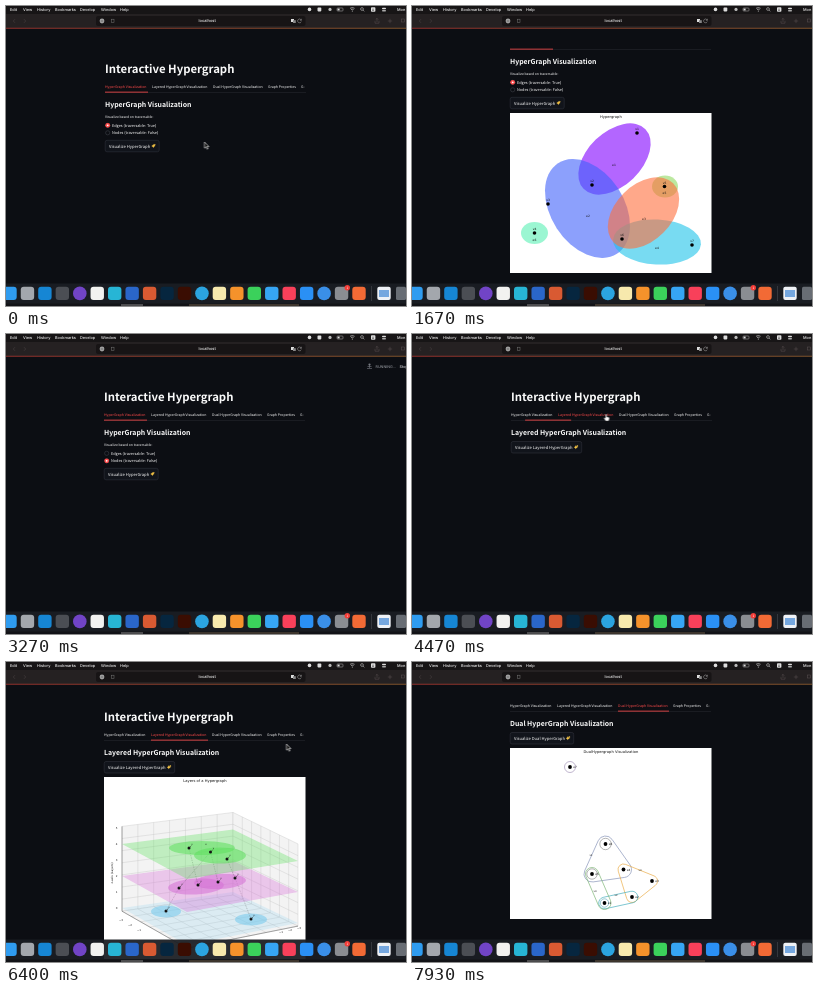
These frames come from a looping animation (400 by 300 pixels, 8 s). An HTML page:

```html
<!DOCTYPE html>
<html lang="en">
<head>
<meta charset="utf-8">
<title>Interactive Hypergraph</title>
<style>
html, body { margin: 0; width: 100%; height: 100%; overflow: hidden; background: #0c0e13; }
svg { display: block; width: 100vw; height: 100vh; }
text { font-family: "Noto Sans CJK SC", "Noto Sans CJK JP", "Open Sans", sans-serif; font-weight: 500; fill: #fafafa; text-rendering: geometricPrecision; white-space: pre; }
.title { font-weight: 700; }
.ui { font-family: Inter, sans-serif; }
.plot text { font-family: "DejaVu Sans", sans-serif; font-weight: 400; fill: #111; text-anchor: middle; }
#page, #cursor, #bar, .cut { animation: 8s linear infinite; }
.cut { animation-timing-function: step-end; }
#page { animation-name: scroll; }
#bar { animation-name: bar; }
#cursor { animation-name: move; }
#arrow { animation-name: arrow; }
#hand { animation-name: hand; }
#home { animation-name: home; }
#layered { animation-name: layered; }
#dual { animation-name: dual; }
#homePlot { animation-name: homePlot; }
#layeredPlot { animation-name: layeredPlot; }
#dualPlot { animation-name: dualPlot; }
#edgesOn { animation-name: edgesOn; }
#nodesOn { animation-name: nodesOn; }
#running { animation-name: running; }
#tab0 { animation-name: tab0; }
#tab1 { animation-name: tab1; }
#tab2 { animation-name: tab2; }

@keyframes scroll {
  0%, 11.2% { transform: translate(0, 0); }
  11.25%, 14.4% { transform: translate(-1px, 0); animation-timing-function: ease-in-out; }
  20%, 27% { transform: translate(-1px, -43px); animation-timing-function: ease-in-out; }
  32.5%, 43.75% { transform: translate(-1px, 0); animation-timing-function: ease-in-out; }
  47%, 49.4% { transform: translate(-1px, -30px); animation-timing-function: ease-in-out; }
  52.5%, 54.99% { transform: translate(-1px, 0); }
  55%, 64.99% { transform: translate(0, 0); }
  65%, 73.75% { transform: translate(-1px, 0); animation-timing-function: ease-in-out; }
  78.75%, 83.74% { transform: translate(-1px, -8px); }
  83.75%, 91.8% { transform: translate(0, 0); }
  91.85%, 93.5% { transform: translate(-1px, 0); animation-timing-function: ease-in-out; }
  97.5%, 100% { transform: translate(-1px, -37px); }
}
@keyframes bar {
  0%, 55% { transform: translate(99px, 0) scaleX(43); }
  55.88% { transform: translate(113px, 0) scaleX(46); }
  58%, 83.75% { transform: translate(146px, 0) scaleX(57); }
  86.5%, 100% { transform: translate(207px, 0) scaleX(51); }
}
@keyframes move {
  0%, 1.5% { transform: translate(198.5px, 136px); animation-timing-function: ease-in-out; }
  6%, 31% { transform: translate(140px, 140px); animation-timing-function: ease-in-out; }
  35.5%, 37% { transform: translate(122px, 126px); animation-timing-function: ease-in-out; }
  39.5%, 52% { transform: translate(136px, 140px); animation-timing-function: ease-in-out; }
  54.8%, 57% { transform: translate(193.5px, 80px); animation-timing-function: ease-in-out; }
  61%, 73% { transform: translate(145px, 113px); animation-timing-function: ease-in-out; }
  79%, 80.3% { transform: translate(280.5px, 82px); animation-timing-function: ease-in-out; }
  83.4%, 84.5% { transform: translate(236px, 72px); animation-timing-function: ease-in-out; }
  88%, 100% { transform: translate(142px, 113px); }
}
@keyframes arrow { 0% { opacity: 1 } 14.4% { opacity: 0 } 31% { opacity: 1 } 40% { opacity: 0 } 51.5% { opacity: 1 } 54.5% { opacity: 0 } 57.5% { opacity: 1 } 65% { opacity: 0 } 74% { opacity: 1 } 83% { opacity: 0 } 85% { opacity: 1 } 92%, 100% { opacity: 0 } }
@keyframes hand { 0% { opacity: 0 } 54.5% { opacity: 1 } 57.5% { opacity: 0 } 83% { opacity: 1 } 85%, 100% { opacity: 0 } }
@keyframes home { 0% { opacity: 1 } 55%, 100% { opacity: 0 } }
@keyframes layered { 0% { opacity: 0 } 55% { opacity: 1 } 83.75%, 100% { opacity: 0 } }
@keyframes dual { 0% { opacity: 0 } 83.75%, 100% { opacity: 1 } }
@keyframes homePlot { 0% { opacity: 0 } 11.25% { opacity: 1 } 36.9% { opacity: 0 } 41.9% { opacity: 1 } 55%, 100% { opacity: 0 } }
@keyframes layeredPlot { 0% { opacity: 0 } 65%, 100% { opacity: 1 } }
@keyframes dualPlot { 0% { opacity: 0 } 91.85%, 100% { opacity: 1 } }
@keyframes edgesOn { 0% { opacity: 1 } 36.5%, 100% { opacity: 0 } }
@keyframes nodesOn { 0% { opacity: 0 } 36.5%, 100% { opacity: 1 } }
@keyframes running { 0% { opacity: 0 } 7.5% { opacity: 1 } 11.25% { opacity: 0 } 36.5% { opacity: 1 } 42% { opacity: 0 } 62% { opacity: 1 } 65% { opacity: 0 } 89% { opacity: 1 } 92%, 100% { opacity: 0 } }
@keyframes tab0 { 0% { fill: #ff4b4b } 55%, 100% { fill: #fafafa } }
@keyframes tab1 { 0% { fill: #fafafa } 55% { fill: #ff4b4b } 83.75%, 100% { fill: #fafafa } }
@keyframes tab2 { 0% { fill: #fafafa } 83.75%, 100% { fill: #ff4b4b } }
</style>
</head>
<body>
<svg id="stage" viewBox="0 0 400 300" preserveAspectRatio="none"></svg>
<script>
const background = '#0c0e13';
const text = (x, y, size, words, extra = '') =>
  `<text x="${x}" y="${y}" font-size="${size}" ${extra}>${words}</text>`;
const rect = (x, y, w, h, fill, extra = '') =>
  `<rect x="${x}" y="${y}" width="${w}" height="${h}" fill="${fill}" ${extra}/>`;
const circle = (x, y, r, fill, extra = '') =>
  `<circle cx="${x}" cy="${y}" r="${r}" fill="${fill}" ${extra}/>`;
const path = (d, stroke, width, extra = '') =>
  `<path d="${d}" fill="none" stroke="${stroke}" stroke-width="${width}" ${extra}/>`;
const oval = (x, y, rx, ry, turn, fill, alpha = .6) =>
  `<ellipse rx="${rx}" ry="${ry}" transform="translate(${x} ${y}) rotate(${turn})" fill="${fill}" opacity="${alpha}"/>`;
const group = (id, body, cls = 'cut') => `<g id="${id}" class="${cls}">${body}</g>`;
const polygon = (points, fill, alpha) =>
  `<polygon points="${points.join(' ')}" fill="${fill}" fill-opacity="${alpha}"/>`;

const heading = words => text(99, 100.8, 6.9, words, 'class="title"');
const sparkle = (x, y) =>
  `<path transform="translate(${x} ${y})" fill="#f5c445" d="M0-2Q.3-.3 2 0Q.3.3 0 2Q-.3.3-2 0Q-.3-.3 0-2ZM1.5-2.3l.4.7.7.4-.7.4-.4.7-.4-.7-.7-.4.7-.4Z"/>`;
const button = (y, width, words) =>
  rect(99.2, y, width, 11.5, '#11141b', 'rx="1.8" stroke="#363942" stroke-width=".5"') +
  text(103, y + 7.3, 4.15, words) + sparkle(93.3 + width, y + 5.7);
const radio = (y, words, id) =>
  circle(101.7, y, 2.1, background, 'stroke="#3d4049" stroke-width=".6"') +
  group(id, circle(101.7, y, 2.4, '#ff4b4b') + circle(101.7, y, .9, '#fff')) +
  text(106, y + 1.6, 3.85, words);
const plot = (id, height, top, title, body, scrolled) => group(id,
  `<g class="plot">${rect(99, top, 201.5, height, '#fff')}${text(199.9, top + 5, 3.7, title)}
  <g transform="translate(1 ${scrolled})">${body}</g></g>`);

function homePlot() {
  const nodes = [[225, 127], [180, 179], [136, 198], [122.5, 227], [252.5, 180.5], [210, 233], [280, 239]];
  const edges = [[202, 160], [176, 211], [232, 213.5], [245, 243], [252.5, 188], [122.5, 235]];
  const body = oval(202.5, 153, 43, 27, -44, '#8000ff') + oval(175.5, 202.5, 54, 36.6, 57, '#4062fa') +
    oval(245, 236, 44, 22.5, 3, '#1fc4e9') + oval(122.5, 227, 13.5, 11, 0, '#58f0b4') +
    oval(253, 180.5, 13, 11, 0, '#8fd860') + oval(231.5, 207, 42, 28, -45, '#ff6e3c') +
    nodes.map(([x, y], i) => circle(x, y, 1.8, '#000') + text(x, y - 2.6, 3, 'v' + (i + 1))).join('') +
    edges.map(([x, y], i) => text(x, y, 3, 'e' + (i + 1))).join('');
  return plot('homePlot', 160, 150, 'Hypergraph', body, 43);
}

function layeredPlot() {
  const mix = (a, b, k) => [a[0] + (b[0] - a[0]) * k, a[1] + (b[1] - a[1]) * k];
  const corners = z => [[116, 254 - 16 * z], [227, 238 - 15.6 * z], [292, 269 - 15.5 * z], [181, 291 - 16.5 * z]];
  const mesh = (a, b, c, d) => {
    let lines = '';
    for (let i = 0; i <= 7; i++) {
      const k = i / 7;
      lines += `M${mix(a, b, k)}L${mix(d, c, k)}M${mix(a, d, k)}L${mix(b, c, k)}`;
    }
    return polygon([a, b, c, d], '#f3f3f3', 1) + path(lines, '#c4c4c4', .4);
  };
  const low = corners(-.2), high = corners(5.1);
  const layer = (z, fill, alpha, ovals, nodes) => polygon(corners(z), fill, alpha) +
    ovals.map(o => oval(...o, fill, .55)).join('') +
    nodes.map(([x, y]) => circle(x, y, 1.5, '#111') + path(`M${x},${y}l2.5,-2.5`, '#222', .5) +
      text(x + 3, y - 3, 2.4, 'v')).join('');
  const top = [[183, 194], [204.5, 198], [221, 205]];
  const middle = [[173, 234], [192, 231], [212, 228], [229, 224]];
  const bottom = [[160, 257], [245, 265]];
  const link = (a, b) => path(`M${a}L${b}`, '#555', .4, 'stroke-dasharray=".8 1"');
  const body = mesh(low[0], low[1], high[1], high[0]) + mesh(low[1], low[2], high[2], high[1]) +
    mesh(...low) + path(`M${high[0]}L${low[0]}L${low[3]}L${low[2]}`, '#333', .4) +
    layer(0, '#72c8ec', .18, [[160, 257.5, 15, 6, 0], [245, 265.5, 16, 6, 0]], bottom) +
    link(middle[0], bottom[0]) + link(middle[3], bottom[1]) +
    layer(2, '#d66fd6', .35, [[190, 232.5, 28, 8, -3], [214, 227.5, 26, 7.5, -3]], middle) +
    link(top[0], middle[1]) + link(top[1], middle[0]) + link(top[2], middle[3]) + link(top[1], middle[2]) +
    layer(4, '#5ee05e', .35, [[196, 194, 33, 7, 0], [214, 201.5, 26, 8, 0]], top) +
    text(200, 191, 2.4, 'e') +
    [0, 1, 2, 3, 4, 5].map(z => text(110.5, 255 - 16 * z, 2.7, z)).join('') +
    text(0, 0, 2.9, 'z-axis (Layers)', 'transform="translate(106.5 219) rotate(-90)"') +
    [3, 2, 1].map((n, i) => text(115 + i * 9, 267 + i * 5, 2.7, '−' + n) + text(293 - i * 9, 275 + i * 2, 2.7, '−' + n)).join('');
  return plot('layeredPlot', 201, 123, 'Layers of a Hypergraph', body, 0);
}

// Rounded outline at distance r around clockwise points.
function hull(points, r, color) {
  const sides = points.map((a, i) => {
    const b = points[(i + 1) % points.length];
    const dx = b[0] - a[0], dy = b[1] - a[1], k = r / Math.hypot(dx, dy);
    return [[a[0] + dy * k, a[1] - dx * k], [b[0] + dy * k, b[1] - dx * k]];
  });
  const arcs = sides.map(([start, end]) => `A${r},${r} 0 0 1 ${start}L${end}`).join('');
  return path(`M${sides[sides.length - 1][1]}${arcs}`, color, .65);
}

function dualPlot() {
  const lone = [158, 105], peak = [193.5, 182], left = [180, 212], mid = [211.5, 207.5],
    right = [240, 219], low = [220, 235], base = [192.5, 241];
  const ring = (p, r, color) => circle(...p, r, 'none', `stroke="${color}" stroke-width=".55"`);
  const body = hull([peak, mid, left], 8, '#7f8db4') + hull([mid, right, low], 5.5, '#e9a83c') +
    hull([base, low], 5.8, '#3aa9b8') + hull([left, base], 6.5, '#74b06c') +
    ring(lone, 5.5, '#8d7ba8') + ring(peak, 5.7, '#777') + ring(left, 5.2, '#777') + ring(base, 4.2, '#4a9fb0') +
    [lone, peak, left, mid, right, low, base].map(([x, y], i) =>
      circle(x, y, 1.9, '#000') + text(x + 5, y + 1, 2.9, 'e' + (7 - i))).join('') +
    [[179, 194], [204, 233.5], [228, 209], [183, 230]].map(([x, y], i) => text(x, y, 2.5, 'v' + (i + 1))).join('');
  return plot('dualPlot', 171, 123, 'DualHypergraph Visualization', body, 37);
}

function page() {
  const tabs = [[99, 'HyperGraph Visualization'], [146, 'Layered HyperGraph Visualization'],
    [207, 'Dual HyperGraph Visualization'], [262, 'Graph Properties'], [295, 'G‑']];
  return group('page',
    text(99, 67, 11.33, 'Interactive Hypergraph', 'class="title"') +
    tabs.map(([x, words], i) => text(x, 81.6, 3.53, words, `id="tab${i}" class="cut"`)).join('') +
    rect(99, 86, 201, .4, '#30333b') + rect(0, 85.7, 1, .8, '#ff4b4b', 'id="bar"') +
    group('home', heading('HyperGraph Visualization') + text(99, 112, 3.4, 'Visualize based on traversable:') +
      radio(119.3, 'Edges (traversable: True)', 'edgesOn') + radio(126.8, 'Nodes (traversable: False)', 'nodesOn') +
      button(134.3, 54, 'Visualize HyperGraph') + homePlot()) +
    group('layered', heading('Layered HyperGraph Visualization') +
      button(107.5, 70.5, 'Visualize Layered HyperGraph') + layeredPlot()) +
    group('dual', heading('Dual HyperGraph Visualization') +
      button(107.5, 63.5, 'Visualize Dual HyperGraph') + dualPlot()), '');
}

function browser() {
  const ui = (x, y, size, words, fill = '#eee') => text(x, y, size, words, `class="ui" style="fill:${fill}"`);
  const menu = [[4, 'Edit'], [17, 'View'], [31, 'History'], [49, 'Bookmarks'], [74, 'Develop'], [95, 'Window'], [114, 'Help']];
  return rect(0, 22, 400, 18, background) +
    group('running', circle(363.5, 30.5, 1.1, '#777a82') + path('M361 34.5h5M363.5 31v3M361.5 32.5h4', '#777a82', .6) +
      ui(369.5, 33.8, 3.7, 'RUNNING...', '#8d9097') + ui(393.5, 33.8, 3.8, 'Stop', '#d5d6d9')) +
    rect(0, 0, 400, 8, '#171516') + rect(0, 8, 400, 14, '#252122') +
    rect(90, 10, 209.5, 10, '#171415', 'rx="2"') +
    rect(0, 21.8, 400, .9, 'url(#glow)', 'opacity=".65"') +
    menu.map(([x, words]) => ui(x, 4.8, 3.9, words)).join('') +
    ui(192.5, 16.4, 4, 'localhost') + ui(391, 4.8, 3.9, 'Mon') +
    circle(96, 15, 2.4, '#a0a0a0') + path('M94.8 15h2.4', '#333', .5) +
    rect(105.4, 13.2, 2.6, 3.4, 'none', 'stroke="#777" stroke-width=".5"') +
    rect(285, 13, 3, 3, '#ddd') + rect(287, 14.2, 2.8, 2.8, '#888') +
    path('M295.2 14a1.9 1.9 0 1 0 .1 1.6M295.4 12.8v1.5h-1.5', '#aaa', .5) +
    path('M9 13.2l-1.7 1.8 1.7 1.8M18 13.2l1.7 1.8-1.7 1.8', '#4b4344', .6) +
    path('M371 16v-3.6M369.7 13.6l1.3-1.3 1.3 1.3M369 14.8v2.4h4v-2.4M384 12.8v4.4M381.8 15h4.4', '#5a5152', .5) +
    rect(395.5, 13, 3, 3, 'none', 'stroke="#5a5152" stroke-width=".5"') +
    circle(303.5, 3.4, 1.8, '#ddd') + rect(311.5, 1.6, 3.8, 3.8, '#ddd', 'rx=".8"') + circle(324, 3.4, 1.6, '#bbb') +
    rect(331, 2, 6, 3, 'none', 'rx=".8" stroke="#bbb" stroke-width=".5"') + rect(331.6, 2.6, 2, 1.8, '#ddd') +
    path('M344 2.3q2.3-1.5 4.6 0M345 3.6q1.3-.8 2.6 0', '#ddd', .6) + circle(346.3, 5, .5, '#ddd') +
    circle(356, 3, 1.4, 'none', 'stroke="#ddd" stroke-width=".5"') + path('M357 4l1.3 1.4', '#ddd', .5) +
    rect(365, 1.3, 4.4, 4.4, '#ddd', 'rx=".8"') + text(366, 4.8, 3.4, 'A', 'style="fill:#111"') +
    rect(376, 1.8, 4, 1.5, '#ddd', 'rx=".7"') + rect(376, 4, 4, 1.5, '#aaa', 'rx=".7"');
}

function dock() {
  const colors = ['#2f9cf0', '#a3a7ad', '#1686d4', '#4b4e54', '#7144c6', '#f2f2f0', '#27b5d5', '#2a66c9', '#d95a32',
    '#06263f', '#3a0d02', '#2ba4e0', '#f7e9ad', '#f5922b', '#3bd15b', '#36a5f4', '#f8405a', '#2a90f5', '#3a8fe8', '#8a8d92', '#f26a35'];
  const round = [4, 11, 18];
  const icons = colors.map((color, i) => {
    const x = 4 + 17.45 * i;
    return round.includes(i) ? circle(x, 287.4, 6.8, color) : rect(x - 6.7, 280.7, 13.4, 13.4, color, 'rx="3"');
  }).join('');
  return rect(0, 297, 400, 3, '#121317') + rect(115, 298, 22, 2, '#4c4c4e') + rect(183, 298, 110, 2, '#3d352d') +
    rect(-10, 277.5, 420, 20, '#1b1e24', 'opacity=".94"') + icons +
    circle(341.3, 281.8, 2.7, '#f33d38') + text(340.4, 283, 3.2, '1') +
    rect(365.3, 280, .5, 15, '#50535a') + rect(371.3, 280.7, 13.4, 13.4, '#eef1f6', 'rx="2"') +
    rect(373, 284, 10, 7, '#75a7df') + rect(390, 280.7, 10, 13.4, '#686d74', 'rx="1.5"');
}

const pointer = group('cursor',
  group('arrow', '<path d="M0 0V6.2L1.5 4.9 2.6 7.2 3.6 6.7 2.5 4.5H4.4Z" fill="#111" stroke="#eee" stroke-width=".6"/>') +
  group('hand', '<path d="M0 .5Q.7-.4 1.3.5V2.8L3.9 3.4V5L3.1 7H.2L-1.7 4.2-.9 3.6 0 4.3Z" fill="#fff" stroke="#222" stroke-width=".4"/>'), '');

document.getElementById('stage').innerHTML =
  `<defs><linearGradient id="glow"><stop stop-color="#e8453c"/><stop offset="1" stop-color="#c9803a"/></linearGradient></defs>` +
  rect(0, 0, 400, 300, background) + page() + browser() + dock() + pointer;
</script>
</body>
</html>
```
